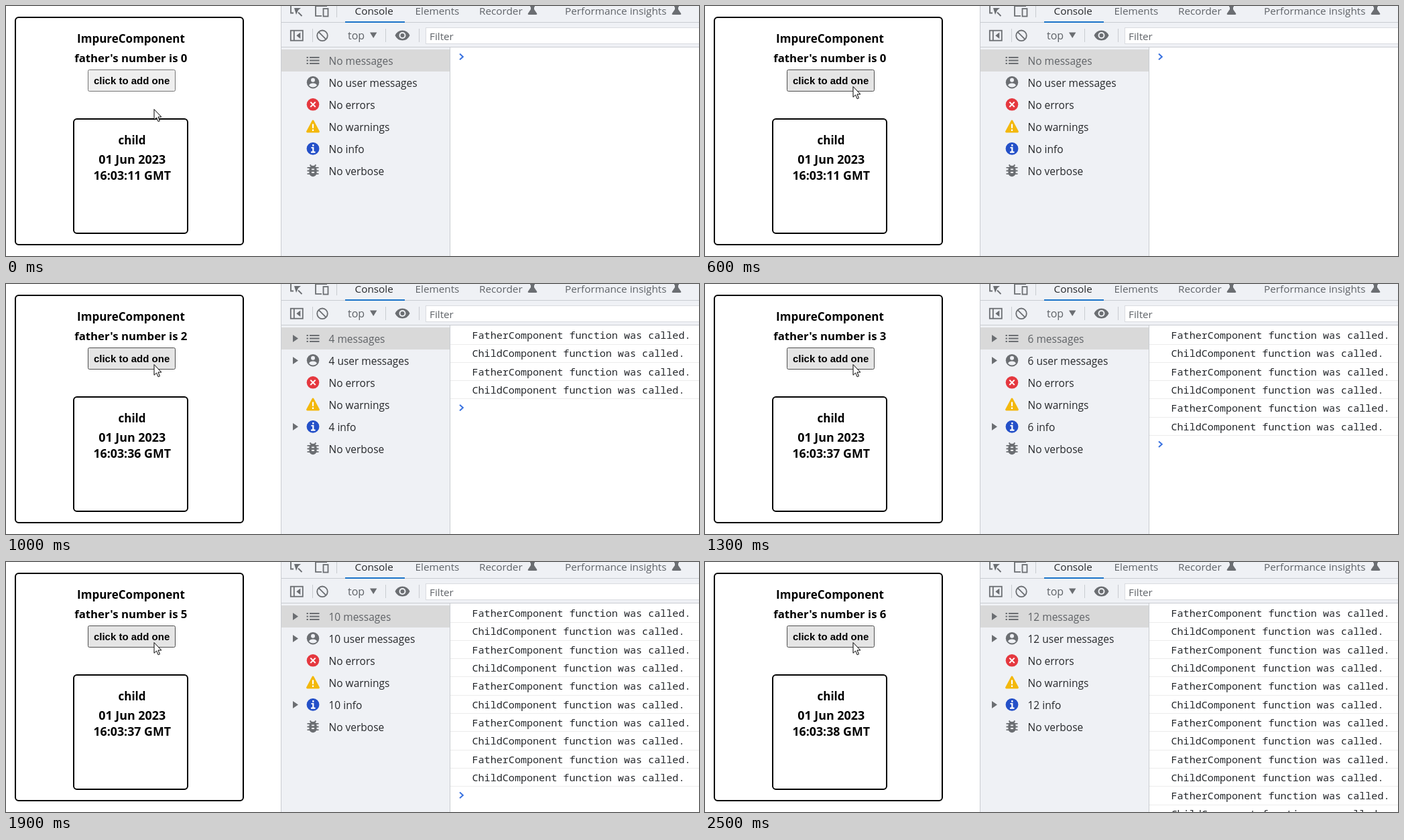
Animation, 1034 px wide and 374 px high, one loop 2.6 s. Source, as an HTML page:

```html
<!DOCTYPE html>
<html lang="en">
<head>
<meta charset="utf-8">
<title>Component render log</title>
<style>
  html, body { margin: 0; width: 100%; height: 100%; overflow: hidden; background: #fff; }
  svg { display: block; width: 1034px; height: 374px; }
  text { font-family: "Open Sans", "Noto Sans", sans-serif; fill: #26282b; white-space: pre; }
  .page text { font-weight: 700; fill: #000; text-anchor: middle; }
  .page .press { font: 700 15px "Liberation Sans", Arial, sans-serif; }
  .tabs text { font-size: 15.3px; fill: #5f6368; }
  .tabs .active { fill: #26282b; }
  .tabs .scope { font-size: 16px; }
  .side text { font-size: 15.5px; }
  .side text:first-child { fill: #5f6266; }
  .log text { font: 15.1px "Noto Sans Mono", "DejaVu Sans Mono", monospace; fill: #24272b; }
  .log line { stroke: #ececec; }
  .frame { fill: #fff; stroke: #000; stroke-width: 2; }
  .ink { fill: #6b6e72; }
  .pen { fill: none; stroke: #6b6e72; stroke-width: 1.8; }
  .rule { fill: none; stroke: #c9ccd1; }
</style>
</head>
<body>
<svg viewBox="0 0 1034 374">
  <defs>
    <path id="flask" class="ink" d="M3 0H10V1.6H9V5L13.2 11.3Q14 13 12 13H1Q-1 13 -.2 11.3L4 5V1.6H3Z"/>
    <path id="arrow" class="ink" d="M428 -5.5L436 0L428 5.5Z"/>
  </defs>

  <g class="page">
    <rect class="frame" x="14" y="17" width="340" height="340" rx="4.8"/>
    <text x="186.5" y="55" font-size="17">ImpureComponent</text>
    <text id="count" x="186.3" y="84" font-size="16.8"></text>
    <rect id="button" x="122.5" y="95.5" width="130" height="32" rx="2"/>
    <text class="press" x="187.6" y="117">click to add one</text>
    <rect class="frame" x="101" y="169" width="170" height="171" rx="4.8"/>
    <text x="188" y="207" font-size="17">child</text>
    <text x="188.2" y="236" font-size="17.9">01 Jun 2023</text>
    <text id="clock" x="188.2" y="260" font-size="17.8"></text>
  </g>

  <rect x="410" width="624" height="374" fill="#eff1f5"/>
  <rect x="663" y="62" width="371" height="312" fill="#fff"/>
  <path class="rule" d="M410.5 0V374M411 24.5H1034M411 61.5H1034M662.5 62V374M493.5 0V17M457.5 34V54M566.5 34V54M616.5 34V54"/>

  <g class="tabs">
    <path class="pen" d="M425 -2V10.5H429M436 9.5L441.5 15"/>
    <path class="ink" d="M430 3H440L436 6.2L433 13Z"/>
    <path class="pen" d="M462 -1V14.8H471M462 0H479"/>
    <rect class="pen" x="473.5" y="4" width="7" height="11.5"/>
    <rect x="506" y="23" width="89" height="2" fill="#1a73c8"/>
    <text class="active" x="520.5" y="13">Console</text>
    <text x="610.5" y="13">Elements</text>
    <text x="706" y="13">Recorder</text>
    <text x="834" y="13">Performance insights</text>
    <use href="#flask" x="779"/>
    <use href="#flask" x="994"/>

    <rect class="pen" x="424.8" y="36.7" width="18" height="15"/>
    <path class="pen" d="M429.8 37V52"/>
    <path class="ink" d="M439.3 39.5V49L433.3 44.2Z"/>
    <circle class="pen" cx="472" cy="44.3" r="7.8"/>
    <path class="pen" d="M466.5 38.8L477.5 49.8"/>
    <text class="scope" x="510" y="50">top</text>
    <path class="ink" d="M543 39.5H553.4L548.2 48Z"/>
    <path class="ink" d="M580.5 44Q584 36.5 591.5 36.5T602.5 44Q599 51.5 591.5 51.5T580.5 44Z"/>
    <circle cx="591.5" cy="44" r="5" fill="#eff1f5"/>
    <circle class="ink" cx="591.5" cy="44" r="3"/>
    <rect x="626.5" y="32.5" width="420" height="24" fill="#fff" stroke="#d9dbe0"/>
    <text x="632" y="51">Filter</text>
  </g>

  <g class="side">
    <rect x="411" y="65" width="251" height="33" fill="#d9d9d9"/>
    <g id="labels"></g>
    <path class="pen" d="M448.5 77H451M453 77H467.5M448.5 81.5H451M453 81.5H467.5M448.5 86H451M453 86H467.5"/>
    <circle class="ink" cx="458" cy="114.3" r="9.2"/>
    <circle cx="458" cy="110.8" r="3" fill="#eff1f5"/>
    <path d="M452 118.7Q453.5 115.5 458 115.5T464 118.7Q461.5 121.5 458 121.5T452 118.7Z" fill="#eff1f5"/>
    <circle cx="458" cy="147.3" r="9.3" fill="#e5383f"/>
    <path d="M454.3 143.6L461.7 151M461.7 143.6L454.3 151" stroke="#fff" stroke-width="2"/>
    <path d="M458 172L466.5 188H449.5Z" fill="#f3b80d" stroke="#f3b80d" stroke-width="2.8" stroke-linejoin="round"/>
    <path d="M458 176.5V182.7M458 184.5V187" stroke="#fff" stroke-width="2.2"/>
    <circle cx="458" cy="213.4" r="9.4" fill="#2450c8"/>
    <path d="M458.3 207V209.7M455.5 212H458.3V218.5M455 218.7H461.5" fill="none" stroke="#fff" stroke-width="2.2"/>
    <path class="pen" d="M449.5 241.8H466.5M449.5 246.5H466.5M449.5 251.2H466.5M453.5 237.5L456.5 240.5M462.5 237.5L459.5 240.5"/>
    <rect class="ink" x="452.4" y="238.8" width="11.2" height="16.4" rx="5.6"/>
    <path d="M456 244.4H460M456 249H460" stroke="#eff1f5" stroke-width="1.8"/>
  </g>

  <g class="log" id="log"></g>
  <path id="prompt" d="M677 -4.3L681.8 0L677 4.3" fill="none" stroke="#3871e0" stroke-width="2"/>
  <path id="cursor" d="M.5 .5V16.3L4.1 13L6.6 18.8L9 17.8L6.5 12H11.4Z" fill="#fff" stroke="#000"/>
</svg>

<script>
const LOOP = 2600, TICK = 100, ROW = 27.3;
const clicks = [700, 1000, 1300, 1600, 1900, 2200];
const seconds = [11, 36, 36, 37, 37, 37, 38];
const kinds = ["messages", "user messages", "errors", "warnings", "info", "verbose"];
const counted = [0, 1, 4];

const $ = id => document.getElementById(id);
function add(parent, tag, attrs) {
  const el = document.createElementNS("http://www.w3.org/2000/svg", tag);
  for (const key in attrs) el.setAttribute(key, attrs[key]);
  return parent.appendChild(el);
}

const labels = kinds.map((kind, i) => ({
  kind,
  text: add($("labels"), "text", { x: 481.5, y: 88 + 33 * i }),
  arrow: add($("labels"), "use", { href: "#arrow", y: 81.5 + 33 * i }),
  counts: counted.includes(i),
}));

const rows = Array.from({ length: 12 }, (_, i) => {
  const row = add($("log"), "g", {});
  const name = i % 2 ? "Child" : "Father";
  add(row, "text", { x: 695.5, y: Math.round(82.1 + ROW * i) }).textContent =
    `${name}Component function was called.`;
  const y = Math.round(89.5 + ROW * i) + 0.5;
  add(row, "line", { x1: 663, x2: 1034, y1: y, y2: y });
  return row;
});

function draw(time) {
  const t = Math.floor(time / TICK) * TICK;
  const count = clicks.filter(at => t >= at).length;
  const total = count * 2;

  $("count").textContent = `father's number is ${count}`;
  $("clock").textContent = `16:03:${seconds[count]} GMT`;
  for (const { kind, text, arrow, counts } of labels) {
    const shown = counts && total > 0;
    text.textContent = `${shown ? total : "No"} ${kind}`;
    arrow.style.display = shown ? "" : "none";
  }
  rows.forEach((row, i) => { row.style.display = i < total ? "" : "none"; });
  $("prompt").setAttribute("transform", `translate(0 ${75.9 + ROW * total})`);

  const y = Math.round(154 - 34 * Math.min(t / 600, 1));
  const hover = y < 128;
  $("cursor").setAttribute("transform", `translate(220.5 ${y})`);
  $("button").setAttribute("fill", hover ? "#e5e5e5" : "#efefef");
  $("button").setAttribute("stroke", hover ? "#4f4f4f" : "#767676");
}

const start = performance.now();
function loop() {
  draw((performance.now() - start) % LOOP);
  requestAnimationFrame(loop);
}
loop();
</script>
</body>
</html>
```
